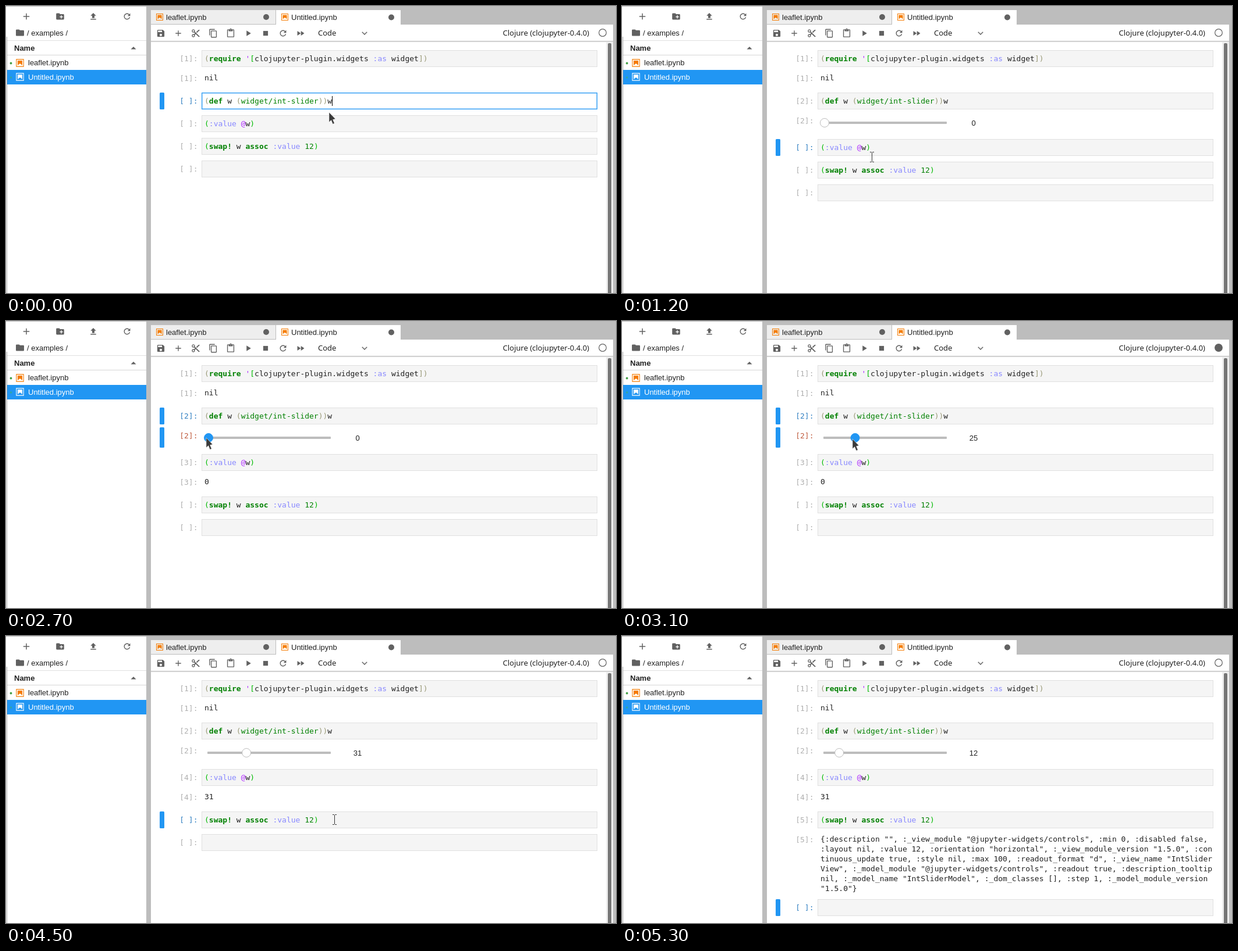
An HTML page that plays this animation: 1048x494 px, repeating every 5400 ms.

```html
<!DOCTYPE html>
<html lang="en">
<head>
<meta charset="utf-8">
<title>Notebook slider</title>
<style>
html, body { margin: 0; width: 100%; height: 100%; overflow: hidden; background: #bdbdbd; }
svg { display: block; }
text { font: 13px "Liberation Sans", Arial, sans-serif; fill: #212121; white-space: pre; }
.ui { font-family: "Noto Sans", "Open Sans", sans-serif; }
.mono { font-family: "DejaVu Sans Mono", monospace; }
.k { fill: #008000; font-weight: bold; }
.s { fill: #008000; }
.p { fill: #999977; }
.g { fill: #00bb00; }
.a { fill: #8888ff; }
.m { fill: #aa22ff; }
</style>
</head>
<body>
<svg width="1048" height="494" viewBox="0 0 1048 494">
  <g id="frame"></g>
  <g id="notebook"></g>
  <circle id="kernel" cx="1025" cy="46" r="6.3" stroke="#616161" stroke-width="1.2"/>
  <g id="pointer"></g>
</svg>
<script>
const STEP = 100, STEPS = 54;
const BLUE = '#2196f3', GREY = '#616161', LINE = '#bdbdbd';
const $ = id => document.getElementById(id);

const rect = (x, y, w, h, fill, more = '') =>
  `<rect x="${x}" y="${y}" width="${w}" height="${h}" fill="${fill}" ${more}/>`;
const circle = (x, y, r, fill, more = '') =>
  `<circle cx="${x}" cy="${y}" r="${r}" fill="${fill}" ${more}/>`;
const text = (x, y, s, more = '') => `<text x="${x}" y="${y}" ${more}>${s}</text>`;
const path = (d, fill, more = '') => `<path d="${d}" fill="${fill}" ${more}/>`;

// Icons on a 24 unit grid
const ICONS = {
  add: 'M19 13h-6v6h-2v-6H5v-2h6V5h2v6h6v2z',
  folder: 'M10 4H4c-1.1 0-2 .9-2 2v12c0 1.1.9 2 2 2h16c1.1 0 2-.9 2-2V8c0-1.1-.9-2-2-2h-8l-2-2z',
  newFolder: 'M20 6h-8l-2-2H4c-1.1 0-2 .9-2 2v12c0 1.1.9 2 2 2h16c1.1 0 2-.9 2-2V8c0-1.1-.9-2-2-2zm-1 8h-3v3h-2v-3h-3v-2h3V9h2v3h3v2z',
  upload: 'M9 16h6v-6h4l-7-7-7 7h4zm-4 2h14v2H5z',
  refresh: 'M17.65 6.35C16.2 4.9 14.2 4 12 4c-4.4 0-8 3.6-8 8s3.6 8 8 8c3.7 0 6.8-2.5 7.7-6h-2.1c-.8 2.3-3 4-5.6 4-3.3 0-6-2.7-6-6s2.7-6 6-6c1.7 0 3.1.7 4.2 1.8L13 11h7V4z',
  save: 'M17 3H5c-1.1 0-2 .9-2 2v14c0 1.1.9 2 2 2h14c1.1 0 2-.9 2-2V7l-4-4zm-5 16c-1.7 0-3-1.3-3-3s1.3-3 3-3 3 1.3 3 3-1.3 3-3 3zm3-10H5V5h10v4z',
  cut: 'M9.6 7.6c.3-.5.4-1 .4-1.6 0-2.2-1.8-4-4-4S2 3.8 2 6s1.8 4 4 4c.6 0 1.1-.1 1.6-.4L10 12l-2.4 2.4C7.1 14.1 6.6 14 6 14c-2.2 0-4 1.8-4 4s1.8 4 4 4 4-1.8 4-4c0-.6-.1-1.1-.4-1.6L12 14l7 7h3v-1zM6 8c-1.1 0-2-.9-2-2s.9-2 2-2 2 .9 2 2-.9 2-2 2zm0 12c-1.1 0-2-.9-2-2s.9-2 2-2 2 .9 2 2-.9 2-2 2zM19 3l-6 6 2 2 7-7V3z',
  copy: 'M16 1H4c-1.1 0-2 .9-2 2v14h2V3h12V1zm3 4H8c-1.1 0-2 .9-2 2v14c0 1.1.9 2 2 2h11c1.1 0 2-.9 2-2V7c0-1.1-.9-2-2-2zm0 16H8V7h11v14z',
  paste: 'M19 2h-4.2C14.4.8 13.3 0 12 0s-2.4.8-2.8 2H5c-1.1 0-2 .9-2 2v16c0 1.1.9 2 2 2h14c1.1 0 2-.9 2-2V4c0-1.1-.9-2-2-2zm-7 0c.6 0 1 .4 1 1s-.4 1-1 1-1-.4-1-1 .4-1 1-1zm7 18H5V4h2v3h10V4h2v16z',
  run: 'M8 5v14l11-7z',
  stop: 'M6 6h12v12H6z',
  forward: 'M4 18l8.5-6L4 6v12zm9-12v12l8.5-6L13 6z'
};
const icon = (name, x, y, scale = .68) =>
  path(ICONS[name], GREY, `transform="translate(${x} ${y}) scale(${scale}) translate(-12 -12)"`);
const fileIcon = (x, y, color, scale) =>
  path('M18.7 3.3v15.4H3.3V3.3h15.4m1.5-1.5H1.8v18.4h18.4zM16.5 16.5l-5.4-4.3-5.6 4.3v-11h11z', color,
    `transform="translate(${x} ${y}) scale(${scale}) translate(-11 -11)"`);

function drawFrame() {
  const orange = '#f57c00';
  const tools = ['save', 'add', 'cut', 'copy', 'paste', 'run', 'stop', 'refresh', 'forward'];
  const sidebar =
    rect(0, 1, 241, 493, '#fff') + rect(1, 53, 1, 441, '#a8a8a8') +
    icon('add', 35, 18, .75) + icon('newFolder', 93, 18) +
    icon('upload', 150, 18) + icon('refresh', 208, 18) +
    icon('folder', 24, 46, .7) + text(36, 51, '/ examples /') +
    rect(2, 59, 239, 1, '#e0e0e0') + rect(2, 84, 239, 1, '#d6d6d6') +
    text(14, 77, 'Name', 'font-weight="bold" style="font-weight:bold"') +
    path('M214.5 74.5l4.5-4.5 4.5 4.5z', GREY) +
    circle(8.5, 98.5, 1.9, '#43a047') + fileIcon(24, 98, orange, .73) + text(38, 102, 'leaflet.ipynb') +
    rect(2, 110, 239, 25, BLUE) + circle(8.5, 123, 1.8, '#31a7a3') +
    fileIcon(24, 122, '#fff', .73) + text(38, 127, 'Untitled.ipynb', 'style="fill:#fff"');
  const panel =
    rect(249, 7, 214, 24, '#eee') + rect(464, 7, 214, 26, '#fff') +
    fileIcon(264, 19, orange, .65) + text(275, 24, 'leaflet.ipynb') + circle(447, 19, 5, GREY) +
    fileIcon(479, 19, orange, .65) + text(490, 24, 'Untitled.ipynb') + circle(662, 19.5, 5, GREY) +
    rect(249, 32, 794, 462, '#fff') +
    rect(249, 60, 794, 1, LINE) + rect(249, 61, 794, 1, '#e4e4e4') + rect(249, 62, 794, 1, '#f6f6f6') +
    tools.map((name, i) => icon(name, 266 + 30 * i, 47)).join('') +
    text(536, 51, 'Code', 'class="ui"') +
    path('M611.8 44.8l4.2 4.2 4.2-4.2', 'none', `stroke="${GREY}" stroke-width="1.4"`) +
    text(1002, 51, 'Clojure (clojupyter-0.4.0)', 'class="ui" text-anchor="end"') +
    rect(1031, 62, 12, 432, '#eee') + rect(1034, 64, 6, 440, '#757575', 'rx="2"');
  $('frame').innerHTML = sidebar + panel;
}

// Code tokens are separated by ~, each led by its class letter
const CODE = [
  "p(~krequire~n ~m'~g[~nclojupyter-plugin.widgets ~a:as~n widget~p])",
  'p(~kdef~n w ~p(~swidget/int-slider~p))~nw',
  'g(~a:value~n ~m@~nw~g)',
  'g(~kswap!~n w ~kassoc~n ~a:value~n ~s12~g)',
  ''
].map(line => line.split('~').map(t => `<tspan class="${t[0]}">${t.slice(1)}</tspan>`).join(''));

const RESULT = [
  '{:description "", :_view_module "@jupyter-widgets/controls", :min 0, :disabled false,',
  ':layout nil, :value 12, :orientation "horizontal", :_view_module_version "1.5.0", :con',
  'tinuous_update true, :style nil, :max 100, :readout_format "d", :_view_name "IntSlider',
  'View", :_model_module "@jupyter-widgets/controls", :readout true, :description_tooltip',
  'nil, :_model_name "IntSliderModel", :_dom_classes [], :step 1, :_model_module_version',
  '"1.5.0"}'
];

const slider = (y, value, held) =>
  rect(346, y - 2, 212, 4, LINE, 'rx="1"') +
  circle(348 + 2.1 * value, y, 7.5, held ? BLUE : '#fff', `stroke="${held ? BLUE : LINE}"`) +
  text(604, y + 5, value, 'text-anchor="middle"');

const prompt = (y, label, color) =>
  text(329.5, y, `[${label}]:`, `class="mono" text-anchor="end" style="fill:${color}"`);
const bar = (y, h) => rect(264, y, 8, h, BLUE, 'rx="1.5"');

function drawNotebook(k) {
  const active = k < 3 ? 1 : k < 18 ? 2 : k < 26 ? 3 : k < 35 ? 1 : k < 38 ? 2 : k < 46 ? 3 : 4;
  const editing = k < 3 || (k >= 35 && k < 38);
  const caretX = active === 1 ? 560 : 427;
  const value = k >= 47 ? 12 : Math.round(31 * Math.min(1, Math.max(0, (k - 27) / 5)));
  const labels = [
    1,
    k < 3 ? ' ' : k < 4 ? '*' : 2,
    k < 18 ? ' ' : k === 18 || k === 38 ? '*' : k < 38 ? 3 : 4,
    k < 46 ? ' ' : k < 47 ? '*' : 5,
    ' '
  ];
  const outputs = [['nil'], k >= 4 && 'slider', k >= 19 && [k < 39 ? '0' : '31'], k >= 47 && RESULT, false];
  let y = 76, svg = '';
  CODE.forEach((code, i) => {
    const on = i === active, edit = on && editing, out = outputs[i];
    if (on) svg += bar(y, 29);
    svg += prompt(y + 19, labels[i], on ? '#307fc1' : '#b0b0b0') +
      rect(336.5, y + .5, 679, 28, edit ? '#fff' : '#f5f5f5', `stroke="${edit ? BLUE : '#e0e0e0'}"`);
    if (edit) svg += rect(337.5, y + 1.5, 677, 26, 'none', `stroke="${BLUE}" opacity=".35"`) +
      rect(caretX, y + 6, 1, 17, '#000');
    svg += text(341, y + 19, code, 'class="mono"');
    if (!out) return y += 39;
    const isSlider = out === 'slider';
    const label = i === 2 && k === 38 ? 3 : labels[i];
    if (on) svg += bar(y + 34, isSlider ? 35 : 29);
    svg += prompt(y + 53, label, on ? '#bf5b3d' : '#b0b0b0') +
      (isSlider ? slider(y + 52, value, k >= 26 && k < 33)
        : out.map((s, n) => text(341, y + 52 + 17 * n, s, 'class="mono"')).join(''));
    y += isSlider ? 80 : out.length > 1 ? 151 : 73;
  });
  $('notebook').innerHTML = svg;
  const busy = (k >= 28 && k < 33) || k === 46;
  $('kernel').setAttribute('fill', busy ? GREY : '#fff');
}

// Pointer stops: step, x, y, text beam
const STOPS = [
  [0, 555, 183, 0], [3, 553, 186, 0], [6, 494, 243, 1], [10, 413, 254, 1], [12, 430, 260, 1],
  [14, 426, 250, 1], [16, 404, 230, 0], [17, 400, 224, 0], [19, 400, 224, 0], [24, 344, 201, 0],
  [27, 344, 201, 0], [32, 409, 203, 0], [35, 452, 243, 1], [38, 452, 243, 1], [41, 558, 326, 1],
  [43, 565, 316, 1], [48, 565, 316, 1], [49, 545, 300, 0], [52, 63, 1, 0], [53, -40, -40, 0]
];
const ARROW = path('M0 0V17L3.7 13.6 6.4 20.2 9.3 19 6.6 12.6 11 11.4Z', '#3a3a3a', 'stroke="#fff" stroke-width=".5"');
const BEAM = path('M-3.5-8.5H-1L0-7.5 1-8.5H3.5M0-7.5V7.5M-3.5 8.5H-1L0 7.5 1 8.5H3.5', 'none', 'stroke="#333"');

function drawPointer(k) {
  const i = STOPS.findLastIndex(stop => stop[0] <= k);
  const [k0, x0, y0, beam] = STOPS[i], [k1, x1, y1] = STOPS[i + 1] || [k0 + 1, x0, y0];
  const f = (k - k0) / (k1 - k0);
  const x = Math.round(x0 + (x1 - x0) * f), y = Math.round(y0 + (y1 - y0) * f);
  $('pointer').innerHTML = beam ? BEAM : ARROW;
  $('pointer').setAttribute('transform', `translate(${beam ? x - .5 : x} ${y})`);
}

let shown = -1;
function tick(now) {
  const k = Math.floor(now / STEP) % STEPS;
  if (k !== shown) {
    shown = k;
    drawNotebook(k);
    drawPointer(k);
  }
  requestAnimationFrame(tick);
}
drawFrame();
tick(0);
</script>
</body>
</html>
```
